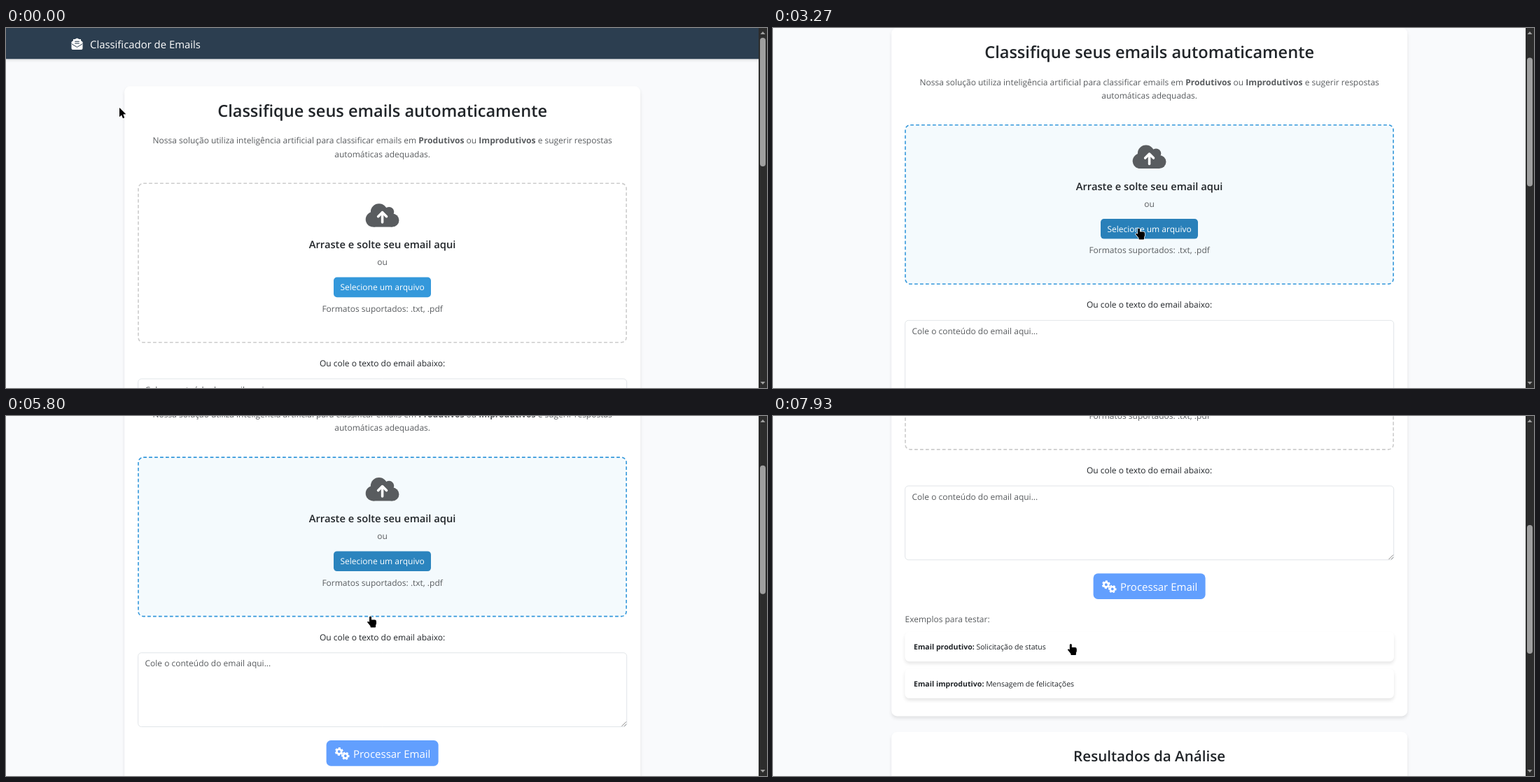
An HTML page with a canvas for the animation above (8000 ms loop, 1087 px wide and 515 px high).

```html
<!DOCTYPE html>
<html lang="pt-BR">
<head>
<meta charset="utf-8">
<title>Classificador de Emails</title>
<style>
  html, body { margin: 0; width: 100%; height: 100%; overflow: hidden; background: #f9fafc; }
  canvas { display: block; width: 1087px; height: 515px; }
</style>
</head>
<body>
<canvas id="stage"></canvas>
<script>
const W = 1087, H = 515, LOOP = 8000, STEP = 79.58, MID = 537.6;
const DARK = '#212529', MUTED = '#595c5f', BLUE = [52, 152, 219];
const dpr = window.devicePixelRatio || 1;

function makeContext(canvas) {
  canvas.width = W * dpr;
  canvas.height = H * dpr;
  const c = canvas.getContext('2d');
  c.scale(dpr, dpr);
  c.textRendering = 'geometricPrecision';
  return c;
}
const main = makeContext(document.getElementById('stage'));
const layer = makeContext(document.createElement('canvas'));
let g = main;

// Timing helpers
const clamp = v => Math.min(1, Math.max(0, v));
const smooth = p => p * p * (3 - 2 * p);
const ease = p => smooth(p ** 0.75);
const ramp = (t, a, b) => ease(clamp((t - a) / (b - a)));
const mix = (a, b, p) => `rgb(${a.map((v, i) => Math.round(v + (b[i] - v) * p))})`;

// Font size factor per weight, from one reference width in em
const FAMILY = '"Open Sans", "Noto Sans", sans-serif';
const factor = {};
for (const [weight, sample, em] of [
  [400, 'Formatos suportados: .txt, .pdf', 13.55],
  [600, 'Classifique seus emails automaticamente', 18.49],
  [700, 'Improdutivos', 6.38]
]) {
  main.font = `${weight} 100px ${FAMILY}`;
  factor[weight] = em * 100 / main.measureText(sample).width;
}
const setFont = (size, weight) => {
  g.font = `${weight} ${(size * factor[weight]).toFixed(2)}px ${FAMILY}`;
};

// Drawing helpers
function text(str, x, y, size, color, weight = 400, align = 'left') {
  setFont(size, weight);
  g.textAlign = align;
  g.fillStyle = color;
  g.fillText(str, x, y);
}
const centered = (str, y, size, color, weight) => text(str, MID, y, size, color, weight, 'center');

function runs(parts, x, y, size, color, center) {
  const widths = parts.map(([str, weight]) => {
    setFont(size, weight);
    return g.measureText(str).width;
  });
  if (center) x -= widths.reduce((a, b) => a + b) / 2;
  parts.forEach(([str, weight], i) => {
    text(str, x, y, size, color, weight);
    x += widths[i];
  });
}

function rect(x, y, w, h, color) {
  g.fillStyle = color;
  g.fillRect(x, y, w, h);
}
function round(x, y, w, h, r, fill, stroke, line = 1) {
  g.beginPath();
  g.roundRect(x, y, w, h, r);
  if (fill) { g.fillStyle = fill; g.fill(); }
  if (stroke) { g.strokeStyle = stroke; g.lineWidth = line; g.stroke(); }
}
function disc(x, y, r, color) {
  g.beginPath();
  g.arc(x, y, r, 0, Math.PI * 2);
  g.fillStyle = color;
  g.fill();
}
function trace(points, close) {
  g.beginPath();
  points.forEach(([x, y], i) => i ? g.lineTo(x, y) : g.moveTo(x, y));
  if (close) g.closePath();
}
function poly(points, color) {
  trace(points, true);
  g.fillStyle = color;
  g.fill();
}
function line(points, color, width = 1) {
  trace(points);
  g.strokeStyle = color;
  g.lineWidth = width;
  g.stroke();
}
function panel(x, y, w, h, r) {
  g.save();
  g.shadowColor = 'rgba(0,0,0,.1)';
  g.shadowBlur = 5 * dpr;
  g.shadowOffsetY = 3.2 * dpr;
  round(x, y, w, h, r, '#fff');
  g.restore();
}

// Page parts
function navbar() {
  g.save();
  g.shadowColor = 'rgba(0,0,0,.12)';
  g.shadowBlur = 4 * dpr;
  g.shadowOffsetY = 1.6 * dpr;
  rect(0, -2, W, 46.3, '#2c3e50');
  g.restore();
  poly([[93.5, 20], [96, 18], [96, 16], [107, 16], [107, 18], [109.5, 20], [109.5, 24], [93.5, 24]], '#fff');
  poly([[98, 16.2], [101.5, 14.6], [105, 16.2]], '#fff');
  round(93.5, 21, 16, 10, 2, '#fff');
  line([[98.3, 19.3], [104.7, 19.3]], '#2c3e50', 1.1);
  line([[98.3, 22], [104.7, 22]], '#2c3e50', 1.1);
  line([[93.5, 22.6], [101.5, 27.4], [109.5, 22.6]], '#2c3e50', 1);
  text('Classificador de Emails', 120, 28.7, 15.8, '#fff');
}

function cloud(x, y) {
  g.save();
  g.translate(x, y);
  g.scale(0.0746, 0.0746);
  rect(144, 200, 368, 280, MUTED);
  for (const [cx, cy, r] of [[144, 336, 144], [256, 192, 160], [448, 192, 96], [512, 352, 128]]) {
    disc(cx, cy, r, MUTED);
  }
  g.lineCap = g.lineJoin = 'round';
  line([[320, 392], [320, 205]], '#fff', 48);
  line([[240, 280], [320, 200], [400, 280]], '#fff', 48);
  g.restore();
}

function gear(x, y, r, turn, hole) {
  g.save();
  g.translate(x, y);
  g.rotate(turn);
  disc(0, 0, r * 0.78, '#fff');
  for (let i = 0; i < 6; i++) {
    g.rotate(Math.PI / 3);
    rect(-r * 0.26, -r, r * 0.52, r, '#fff');
  }
  disc(0, 0, r * 0.34, hole);
  g.restore();
}

function dropzone(t) {
  const hover = ramp(t, 2440, 2760) - ramp(t, 6520, 6790);
  const x = 189, y = 218.3, w = 697.1, h = 227.5, r = 7.2, dash = 4.78;
  round(x, y, w, h, r, `rgba(52,152,219,${0.05 * hover})`);
  const length = 2 * (w + h) - (8 - 2 * Math.PI) * r;
  const period = length / Math.round(length / 7.96);
  g.setLineDash([dash, period - dash]);
  round(x, y, w, h, r, null, mix([204, 204, 204], BLUE, hover), 1.6);
  g.setLineDash([]);

  cloud(513.7, 244.8);
  centered('Arraste e solte seu email aqui', 311.2, 15.92, DARK, 600);
  centered('ou', 335.2, 12.73, MUTED);

  const over = ramp(t, 3020, 3270) - ramp(t, 5740, 6130);
  const press = Math.sin(Math.PI * clamp((t - 3440) / 190));
  const fill = press > 0.01 ? mix([41, 128, 185], [34, 108, 158], press) : mix(BLUE, [41, 128, 185], over);
  round(468, 352.6, 139, 28.6, 4.8, fill);
  centered('Selecione um arquivo', 371.4, 12.73, '#fff');
  centered('Formatos suportados: .txt, .pdf', 402, 12.73, MUTED);
}

function example(y, label, value) {
  panel(188.4, y, 698.6, 42.3, 6.4);
  runs([[label + ' ', 700], [value, 400]], 201, y + 25.6, 11.14, DARK);
}

function card(t) {
  panel(169.2, 79.3, 737, 748, 8);
  centered('Classifique seus emails automaticamente', 123, 25.47, DARK, 600);
  runs([
    ['Nossa solução utiliza inteligência artificial para classificar emails em ', 400],
    ['Produtivos', 700], [' ou ', 400], ['Improdutivos', 700],
    [' e sugerir respostas', 400]
  ], MID, 161.4, 12.73, MUTED, true);
  centered('automáticas adequadas.', 180.6, 12.73, MUTED);
  dropzone(t);

  centered('Ou cole o texto do email abaixo:', 480, 12.73, DARK);
  round(188.7, 497.9, 698, 105.8, 4.8, '#fff', '#dee2e6', 0.9);
  text('Cole o conteúdo do email aqui...', 198.5, 517.6, 12.73, MUTED);
  line([[879.5, 603], [886, 596.5]], '#777', 0.9);
  line([[883, 603], [886, 600]], '#777', 0.9);

  const primary = '#629ffe';
  round(457.6, 623.2, 160, 36.6, 6.4, primary);
  gear(475.8, 639.2, 5.9, 0.1, primary);
  gear(484.8, 645.4, 5.7, 0.6, primary);
  text('Processar Email', 496, 647.7, 15.92, '#fff');

  text('Exemplos para testar:', 188.5, 693.3, 12.73, MUTED);
  example(710.7 - 4 * ramp(t, 7690, 7950), 'Email produtivo:', 'Solicitação de status');
  example(759.4, 'Email improdutivo:', 'Mensagem de felicitações');
}

function scrollbar(scroll) {
  rect(1075, 0, 12, H, '#2c2c2c');
  round(1077, 14 + scroll * 0.357, 8, 184, 4, '#9f9f9f');
  poly([[1077.5, 9], [1081, 5], [1084.5, 9]], '#9f9f9f');
  poly([[1077.5, 506], [1081, 510], [1084.5, 506]], '#9f9f9f');
}

// File dialog
const PERSON = 'Renildo Tavorno - ';
const FILES = [
  ['Apresentacao', '27/08/2025 21:33', 'Te', '1 KB'],
  ['Currículo do Sistema de Currículos Murvel...', '27/08/2025 21:56', 'A', '179 KB'],
  [PERSON + 'Comercial', '26/05/2025 10:33', 'A', '376 KB'],
  [PERSON + 'Dev (En)', '14/07/2025 09:32', 'A', '134 KB'],
  [PERSON + 'Dev', '03/09/2025 12:23', 'A', '169 KB'],
  [PERSON + 'Murvel', '03/11/2023 19:24', 'A', '1.692 KB'],
  [PERSON + 'Suporte', '01/09/2025 19:15', 'A', '115 KB']
];
const PLACES = [
  ['Área de Trabalho', 11, 8, '#2a9be0'], ['Documentos', 8, 10, '#d5dde3'],
  ['Downloads'], ['Imagens', 11, 8, '#9cc9e8'], ['Músicas'],
  ['Objetos 3D', 10, 9, '#35b8d8'], ['Vídeos', 9, 10, '#8f959c'],
  ['Disco Local (C:)', 11, 5, '#b9bec2'], ['Disco Local (D:)', 11, 5, '#b9bec2']
];
const label = (str, x, y, align) => text(str, x, y + 3.3, 9.35, '#fff', 400, align);
const chevron = (x, y, dir) => line([[x - 3, y - 1.5 * dir], [x, y + 1.5 * dir], [x + 3, y - 1.5 * dir]], '#c8c8c8', 1);

function places() {
  g.save();
  g.beginPath();
  g.rect(9, 0, 110, 267);
  g.clip();
  rect(9, 235, 110, 18, '#404040');
  poly([[36, 18], [40, 18], [41.5, 19.5], [47, 19.5], [47, 29], [36, 29]], '#f3cd62');
  label('pjcts', 51, 23);
  line([[110, 26], [115, 20]], '#a9b0b6', 2);
  disc(35, 48, 4.6, '#2b8fdd');
  label('Nublora - Person', 45, 48);
  rect(29, 68, 12, 8, '#58b5e8');
  rect(32, 77, 7, 1.5, '#b5c6d2');
  label('Este Computador', 44, 73);
  PLACES.forEach(([name, w, h, color], i) => {
    const y = 92.2 + i * 18.95;
    if (color) rect(41 - w / 2, y - h / 2, w, h, color);
    else if (name === 'Downloads') poly([[39.3, y - 5], [42.7, y - 5], [42.7, y], [45.5, y], [41, y + 5], [36.5, y], [39.3, y]], '#3d9ae0');
    else {
      disc(39, y + 3, 2.2, '#38a8ee');
      line([[40.6, y + 3], [40.6, y - 5], [44, y - 2]], '#38a8ee', 1.3);
    }
    label(name, 51, y);
  });
  disc(36, 267, 4, '#6ab4dd');
  label('Rede', 45, 268);
  g.restore();
  rect(120, 14, 12, 253, '#171717');
  rect(120, 107, 12, 125, '#4d4d4d');
  chevron(126, 22, -1);
  chevron(126, 261, 1);
}

function field(x, y, w, h, fill, edge, width) {
  rect(x, y, w, h, fill);
  g.strokeStyle = edge;
  g.lineWidth = width;
  g.strokeRect(x, y, w, h);
}

function dialogBody() {
  g.save();
  g.shadowColor = 'rgba(0,0,0,.28)';
  g.shadowBlur = 10 * dpr;
  g.shadowOffsetY = 2 * dpr;
  rect(9, -100, 701, 428, '#202020');
  g.restore();
  rect(9, -100, 701, 114, '#2b2b2b');
  rect(9, 267, 701, 61, '#2f2f2f');
  rect(657, -6, 12, 12, '#d9e6ef');
  rect(663, -6, 5, 11, '#4c9ed8');
  disc(691.5, 1, 6, '#1673d1');
  text('?', 691.5, 5, 9.4, '#fff', 700, 'center');
  places();

  for (const x of [350, 464, 558, 621]) rect(x, 14, 0.9, 20, '#5c5c5c');
  chevron(247, 15.5, -1);
  [['Nome', 149], ['Data de modificação', 355], ['Tipo', 469], ['Tamanho', 563]]
    .forEach(([str, x]) => label(str, x, 23));
  FILES.forEach(([name, date, kind, size], i) => {
    const y = 46.5 + i * 16.58;
    poly([[151, y - 6], [157.5, y - 6], [160.5, y - 3], [160.5, y + 6.5], [151, y + 6.5]], '#fafafa');
    poly([[157.5, y - 6], [160.5, y - 3], [157.5, y - 3]], '#b8bec4');
    label(name, 166, y);
    label(date, 355, y);
    label(`Documento d${i ? 'o' : 'e'} ${kind}...`, 469, y);
    label(size, 615, y, 'right');
  });

  label('Nome:', 140, 284, 'right');
  field(144.5, 275, 394, 18, '#383838', '#f2f2f2', 1);
  rect(147.5, 278, 0.9, 12, '#fff');
  chevron(531, 284, 1);
  field(548, 275, 148, 18, '#333', '#a5a5a5', 1);
  label('Arquivos personalizados', 551.5, 284);
  chevron(689, 284, 1);
  field(548.7, 298.5, 68, 19, '#333', '#fff', 1.7);
  label('Abrir', 583, 308, 'center');
  field(627.5, 298.5, 68, 19, '#333', '#e4e4e4', 1.3);
  label('Cancelar', 661.5, 308, 'center');
  for (let i = 0; i < 3; i++) {
    for (let j = 0; j <= i; j++) rect(706 - j * 2.5, 320 + i * 2.5, 1.3, 1.3, '#aaa');
  }
  g.strokeStyle = '#4f8fbd';
  g.lineWidth = 0.9;
  g.strokeRect(9.3, -100, 700.5, 428);
}

function dialog(t) {
  if (t < 4070 || t >= 4800) return;
  const shown = 1 - (1 - clamp((t - 4070) / 260)) ** 2.32;
  const p = shown * (1 - smooth(clamp((t - 4530) / 260)));
  const zoom = 0.94 + 0.075 * p;
  g = layer;
  g.clearRect(0, 0, W, H);
  g.save();
  g.translate(359.5, 120);
  g.scale(zoom, zoom);
  g.translate(-359.5, -120);
  dialogBody();
  g.restore();
  g = main;
  g.globalAlpha = p;
  g.drawImage(layer.canvas, 0, 0, W, H);
  g.globalAlpha = 1;
}

// Pointer
const PATH = [
  [0, 162, 114], [400, 162, 114], [1200, 295.5, 116.5], [1950, 295.5, 116.5],
  [2470, 370, 142], [2530, 370, 142], [3270, 522.5, 286.5], [4070, 522.5, 286.5],
  [4200, 523.5, 284.5], [4530, 523.5, 284.5], [4650, 520.5, 286.5], [6470, 520.5, 286.5],
  [6600, 522, 286.8], [7600, 522, 286.8], [7830, 425.3, 326], [LOOP, 425.3, 326]
];
function pointerAt(t) {
  const i = PATH.findIndex(k => k[0] > t);
  const [t0, x0, y0] = PATH[i - 1], [t1, x1, y1] = PATH[i];
  const p = smooth((t - t0) / (t1 - t0));
  return [x0 + (x1 - x0) * p, y0 + (y1 - y0) * p];
}

function arrow() {
  trace([[0, 0], [0, 13.2], [3, 10.5], [5, 15.3], [7.3, 14.3], [5.3, 9.6], [9.3, 9.3]], true);
  g.strokeStyle = '#fff';
  g.lineWidth = 1.3;
  g.stroke();
  g.fillStyle = '#000';
  g.fill();
}
function hand() {
  const shape = new Path2D();
  shape.roundRect(-1.5, 0, 3, 10, 1.5);
  shape.roundRect(-1.5, 5, 10, 8, 2.4);
  shape.roundRect(0, 10, 7.6, 6, 1);
  shape.moveTo(-4.6, 8.2);
  shape.lineTo(-3, 7.2);
  shape.lineTo(-0.5, 9.2);
  shape.lineTo(2, 14);
  shape.lineTo(0, 14);
  shape.closePath();
  g.strokeStyle = '#fff';
  g.lineWidth = 1.3;
  g.stroke(shape);
  g.fillStyle = '#000';
  g.fill(shape);
}
function beam(color, width) {
  line([[0, -5.5], [0, 5.5]], color, width);
  line([[-4, -6], [-1, -6], [0, -5], [1, -6], [4, -6]], color, width);
  line([[-4, 6], [-1, 6], [0, 5], [1, 6], [4, 6]], color, width);
}
function pointer(t) {
  const [x, y] = pointerAt(t);
  g.save();
  g.translate(x, y);
  if (t < 2440 || (t >= 7620 && t < 7700)) arrow();
  else if (t >= 4130 && t < 4600) beam('#8c8c8c', 0.9);
  else if (t >= 6590 && t < 7620) beam('#111', 1.35);
  else hand();
  g.restore();
}

function draw(t) {
  const scroll = STEP * (ramp(t, 1670, 1930) + ramp(t, 5600, 5800) +
    2 * ramp(t, 6470, 6760) + ramp(t, 7200, 7400));
  rect(0, 0, W, H, '#f9fafc');
  g.save();
  g.translate(0, -scroll);
  navbar();
  g.save();
  g.translate(0, 4 * (1 - ramp(t, 515, 815)));
  card(t);
  g.restore();
  panel(169.2, 849.9, 737, 300, 8);
  centered('Resultados da Análise', 892, 22.28, DARK, 600);
  g.restore();
  scrollbar(scroll);
  dialog(t);
  pointer(t);
}

const start = performance.now();
function tick() {
  draw((performance.now() - start) % LOOP);
  requestAnimationFrame(tick);
}
tick();
</script>
</body>
</html>
```
